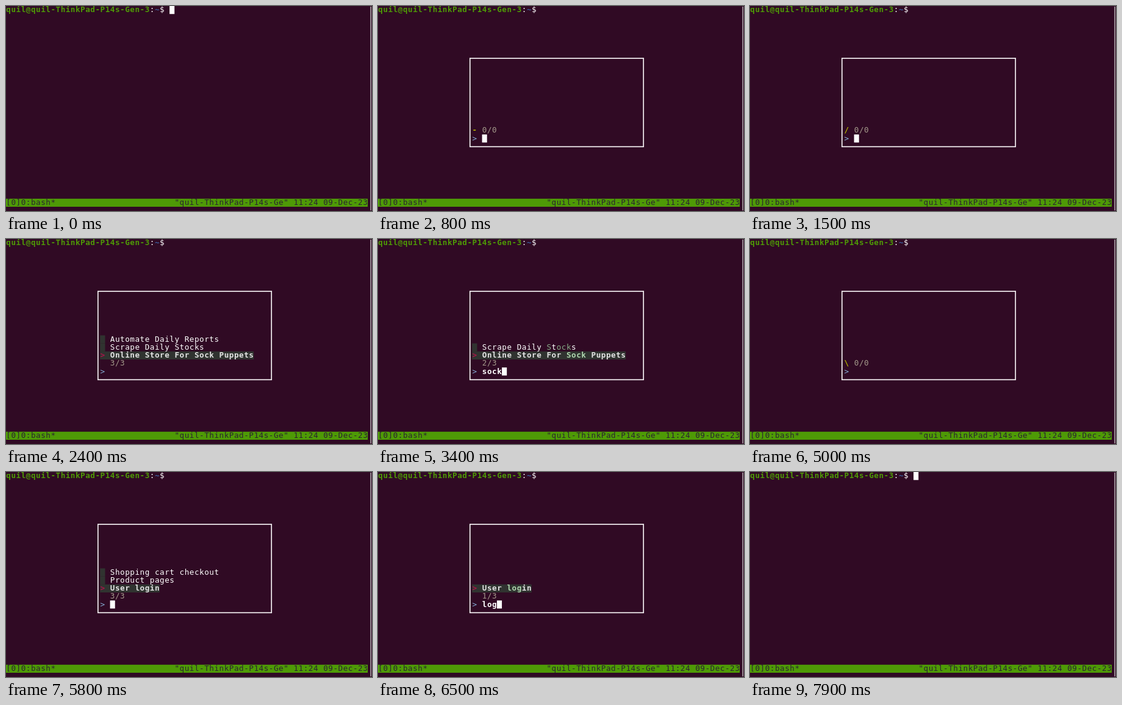
An HTML page with a canvas for the animation above (8000 ms loop, 600 by 337 pixels).

```html
<!DOCTYPE html>
<html lang="en">
<head>
<meta charset="utf-8">
<title>Terminal picker</title>
<style>
  html, body { margin: 0; width: 100%; height: 100%; overflow: hidden; background: #300a24; }
  canvas { display: block; width: 600px; height: 337px; }
</style>
</head>
<body>
<canvas id="term" width="600" height="337"></canvas>
<script>
const ctx = document.getElementById('term').getContext('2d');
const LOOP = 8000;
const CW = 593 / 73, RH = 13.2;
const FONT = '12.6px "DejaVu Sans Mono", "Liberation Mono", monospace';
const C = {
  bg: '#300a24', white: '#ffffff', green: '#4e9a06', blue: '#3c5f9e', status: '#2b2430',
  bar: '#303330', row: '#e4e4e4', match: '#87af87', matchRow: '#afd7af',
  info: '#a3988a', spinner: '#afaf00', prompt: '#87afd7', pointer: '#a8174a'
};

// Each picker: when it opens, when its list is ready, and what gets typed.
const pickers = [
  {
    open: 400, ready: 2300, close: 4300, spin: 0, loadCursor: true, focus: 2500,
    items: ['Online Store For Sock Puppets', 'Scrape Daily Stocks', 'Automate Daily Reports'],
    query: 'sock', typeAt: 2700, keyGap: 200
  },
  {
    open: 4300, ready: 5500, close: 7800, spin: 3, loadCursor: false, focus: 5700,
    items: ['User login', 'Product pages', 'Shopping cart checkout'],
    query: 'log', typeAt: 6100, keyGap: 150
  }
];

function fill(col, row, cols, color) {
  ctx.fillStyle = color;
  ctx.fillRect(col * CW, row * RH, cols * CW, RH);
}

function text(str, col, row, color, bold) {
  ctx.font = (bold ? 'bold ' : '') + FONT;
  [...str].forEach((ch, i) => {
    ctx.fillStyle = typeof color === 'function' ? color(i) : color;
    ctx.fillText(ch, (col + i + 0.5) * CW, row * RH + 10.3);
  });
}

const cursor = (col, row) => fill(col, row, 1, C.white);

// Fuzzy match: scan forward to find the end, then back for the tightest span.
function fuzzy(item, query) {
  const s = item.toLowerCase(), hits = new Set();
  let end = -1;
  for (const ch of query) {
    end = s.indexOf(ch, end + 1);
    if (end < 0) return null;
  }
  let pos = end + 1;
  for (const ch of [...query].reverse()) {
    pos = s.lastIndexOf(ch, pos - 1);
    hits.add(pos);
  }
  return hits;
}

function drawShell(active) {
  const user = 'quil', host = user + '-ThinkPad-P14s-Gen-3';
  const id = user + '@' + host, n = id.length;
  ctx.fillStyle = C.bg;
  ctx.fillRect(0, 0, 600, 337);
  text(id, 0, 0, C.green, true);
  text(':', n, 0, C.white);
  text('~', n + 1, 0, C.blue, true);
  text('$', n + 2, 0, C.white);
  if (active) cursor(n + 4, 0);

  fill(0, 24, 73, C.green);
  text('[0]0:bash*', 0, 24, C.status);
  text(`"${host.slice(0, 21)}" 11:24 09-Dec-23`, 34, 24, C.status);

  ctx.fillStyle = '#94868f';
  ctx.fillRect(597, 1, 2, 335);
}

function drawList(p, query) {
  const found = p.items
    .map(name => ({ name, hits: fuzzy(name, query) }))
    .filter(f => f.hits);
  found.forEach(({ name, hits }, i) => {
    const row = 14 - i, current = i === 0;
    fill(19, row, current ? name.length + 2 : 1, C.bar);
    if (current) text('>', 19, row, C.pointer, true);
    text(name, 21, row, k => hits.has(k)
      ? (current ? C.matchRow : C.match)
      : (current ? C.row : C.white), current);
  });
  text(found.length + '/' + p.items.length, 21, 15, C.info);
}

function drawPicker(p, t) {
  ctx.strokeStyle = '#f4f0f3';
  ctx.lineWidth = 1.7;
  ctx.strokeRect(150.8, 86, 284.4, 145.3);
  if (t < p.open + 100) return;

  const keys = Math.floor((t - p.typeAt) / p.keyGap) + 1;
  const query = p.query.slice(0, Math.max(0, keys));
  if (t < p.ready) {
    text('-\\|/'[(Math.floor(t / 100) + p.spin + 0) % 4 === 1 && p.spin ? 1 : (Math.floor(t / 100) + p.spin) % 4], 19, 15, C.spinner, true);
    text('0/0', 21, 15, C.info);
  } else {
    drawList(p, query);
  }
  text('>', 19, 16, C.prompt);
  text(query, 21, 16, C.white, true);
  if (t < p.ready ? p.loadCursor : t >= p.focus) cursor(21 + query.length, 16);
}

function render(t) {
  const p = pickers.find(p => t >= p.open && t < p.close);
  drawShell(!p);
  if (p) drawPicker(p, t);
}

ctx.textAlign = 'center';
ctx.textBaseline = 'alphabetic';
const start = performance.now();
function tick() {
  render((performance.now() - start) % LOOP);
  requestAnimationFrame(tick);
}
tick();
</script>
</body>
</html>
```
